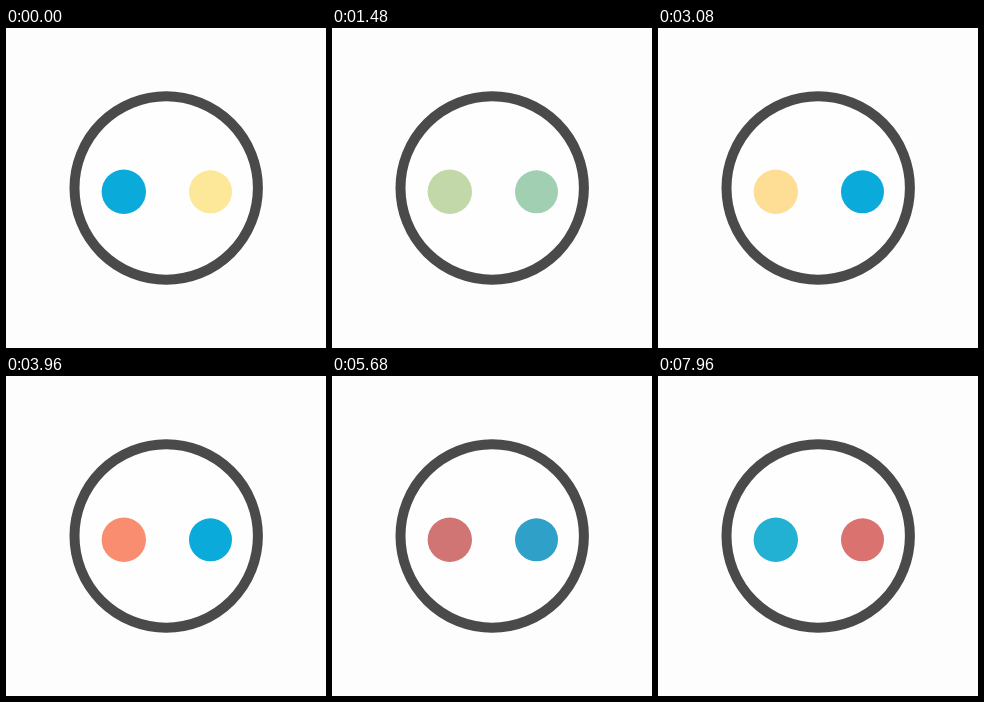
An HTML page for the animation above (8000 ms loop, 320x320 px).

```html
<!DOCTYPE html>
<html lang="en">
<head>
<meta charset="utf-8">
<title>Two pulsing dots</title>
<style>
html, body { margin: 0; width: 100%; height: 100%; overflow: hidden; background: #fdfdfd; }
svg { display: block; width: 100vw; height: 100vh; }
</style>
</head>
<body>
<svg viewBox="0 0 320 320">
  <circle cx="160.2" cy="160" r="91.7" fill="#fefefe" stroke="#4a4a4b" stroke-width="10"/>
  <circle id="left" cx="117.8" cy="163.8"/>
  <circle id="right" cx="204.5" cy="163.8"/>
</svg>
<script>
const LOOP = 8000, FRAME = 40;
const BLUE = [10, 170, 218], YELLOW = [253, 231, 152], RED = [246, 106, 97];

// fades: [start ms, duration ms, next colour]; pulses: start ms
const dots = [
  {
    el: document.getElementById('left'), rest: 22.2, first: BLUE, pulses: [2260, 6400],
    fades: [[505, 1434, YELLOW], [2790, 1800, RED], [5320, 1434, BLUE], [7680, 1434, YELLOW]]
  },
  {
    el: document.getElementById('right'), rest: 21.5, first: YELLOW, pulses: [304, 4400],
    fades: [[878, 1434, BLUE], [5320, 1434, RED], [7650, 1434, BLUE]]
  }
];
const BIG = 32.2, PULSE = 820, RAMP = 260;

function smooth(x) {
  x = Math.min(1, Math.max(0, x));
  return x * x * (3 - 2 * x);
}

function swell(t, start) {
  const u = t - start;
  return smooth(Math.min(u, PULSE - u) / RAMP);
}

function colourAt(dot, t) {
  let c = dot.first;
  for (const [start, length, next] of dot.fades) {
    const k = smooth((t - start) / length);
    c = c.map((v, i) => v + (next[i] - v) * k);
  }
  return `rgb(${c.map(Math.round).join(',')})`;
}

function draw(t) {
  for (const dot of dots) {
    const k = Math.max(...dot.pulses.map(p => swell(t, p)));
    dot.el.setAttribute('r', (dot.rest + (BIG - dot.rest) * k).toFixed(2));
    dot.el.setAttribute('fill', colourAt(dot, t));
  }
}

const origin = performance.now();
function tick() {
  const t = (performance.now() - origin) % LOOP;
  draw(Math.floor(t / FRAME) * FRAME);
  requestAnimationFrame(tick);
}
draw(0);
requestAnimationFrame(tick);
</script>
</body>
</html>
```
